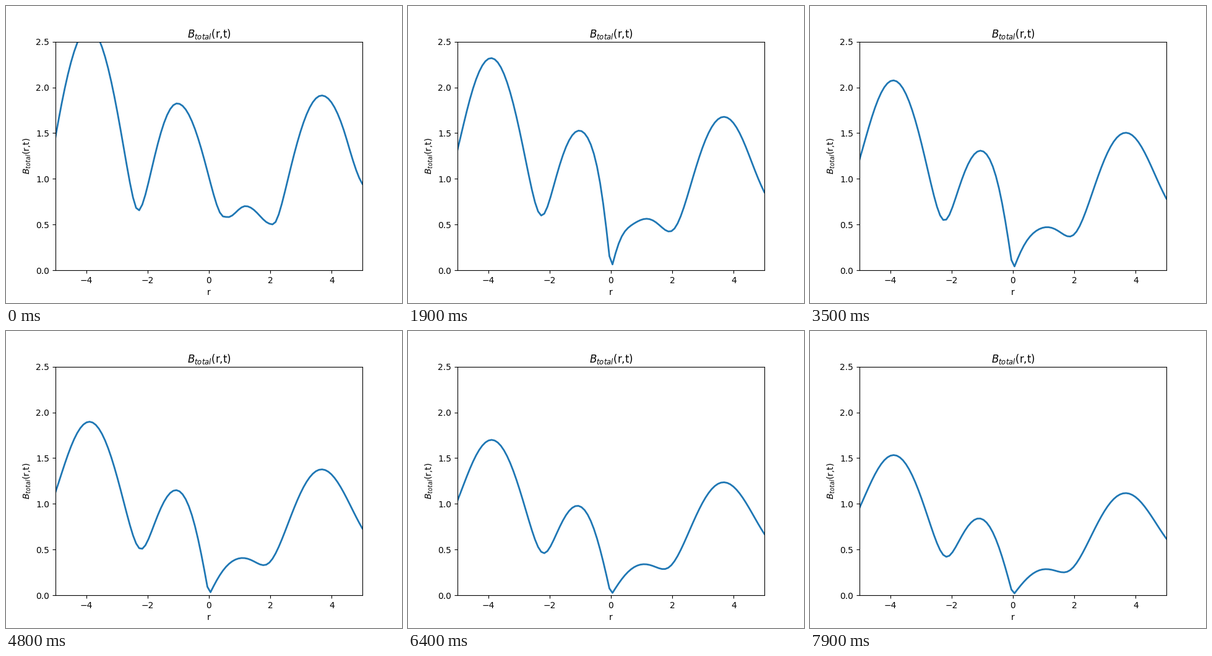
A matplotlib script that plays this animation: 640 by 480 pixels, repeating every 8 s.

```python
import numpy as np
import matplotlib.pyplot as plt
from matplotlib.animation import FuncAnimation

FRAMES, INTERVAL = 80, 100
SUBSTEPS = 20
ETA = 0.0202                 # diffusivity per second
DECAY = ETA * np.pi**2 / 4   # loss through the disc surface
EDGE_DECAY = 0.0535

# Lobes of the starting energy: (centre, height, left width, right width)
LOBES = [(-3.91, 6.593, 1.66, 1.622), (-1.03, 2.931, 1.293, 1.51),
         (1.22, 0.187, 0.62, 0.78), (3.69, 3.531, 1.62, 1.745),
         (6, 1.55, 1.5, 1.5)]

# Turns of the field direction: (weight, steepness, centre)
TURNS = [(-1, 2.9, -5.58), (-1, 3.46, -2.28), (0.6, 1.5, 0.58),
         (1, 2.65, 1.98), (-1, 1.6, 5.45)]


def lobe(centre, height, left, right):
    d = r - centre
    x = np.clip(d / np.where(d < 0, left, right), -1, 1)
    return height * np.cos(np.pi / 2 * x)**2


def start():
    """Both field components at t = 0, held as one complex array."""
    floor = 0.365 - 0.04 * r - 0.007 * r**2
    energy = floor + sum(lobe(*p) for p in LOBES)
    angle = sum(c * np.arctan(k * (r - r0)) for c, k, r0 in TURNS)
    return np.sqrt(energy) * np.exp(1j * angle)


def step(w, dt):
    """Diffuse the field on a cylinder."""
    rate = np.empty_like(w)
    mid = w[1:-1]
    curve = (w[2:] - 2 * mid + w[:-2]) / dr**2
    slope = (w[2:] - w[:-2]) / (2 * dr)
    rate[1:-1] = ETA * (curve + slope / r[1:-1] - mid / r[1:-1]**2) - DECAY * mid
    rate[[0, -1]] = -EDGE_DECAY * w[[0, -1]]
    return w + dt * rate


def evolve():
    w, rows = start(), []
    for _ in range(FRAMES):
        rows.append(np.abs(w))
        for _ in range(SUBSTEPS):
            w = step(w, INTERVAL / 1000 / SUBSTEPS)
    return rows


r = np.linspace(-5, 5, 100)
dr = r[1] - r[0]
field = evolve()

fig, ax = plt.subplots(figsize=(6.4, 4.8), dpi=100)
ax.set(xlim=(-5, 5), ylim=(0, 2.5), xlabel="r", ylabel="$B_{total}$(r,t)")
ax.set_title("$B_{total}$(r,t)", pad=5)
line, = ax.plot(r, field[0], lw=2, color="#1f77b4")


def draw(i):
    line.set_ydata(field[i])
    return line,


anim = FuncAnimation(fig, draw, frames=FRAMES, interval=INTERVAL,
                     repeat=True, repeat_delay=0)
plt.show()
```
